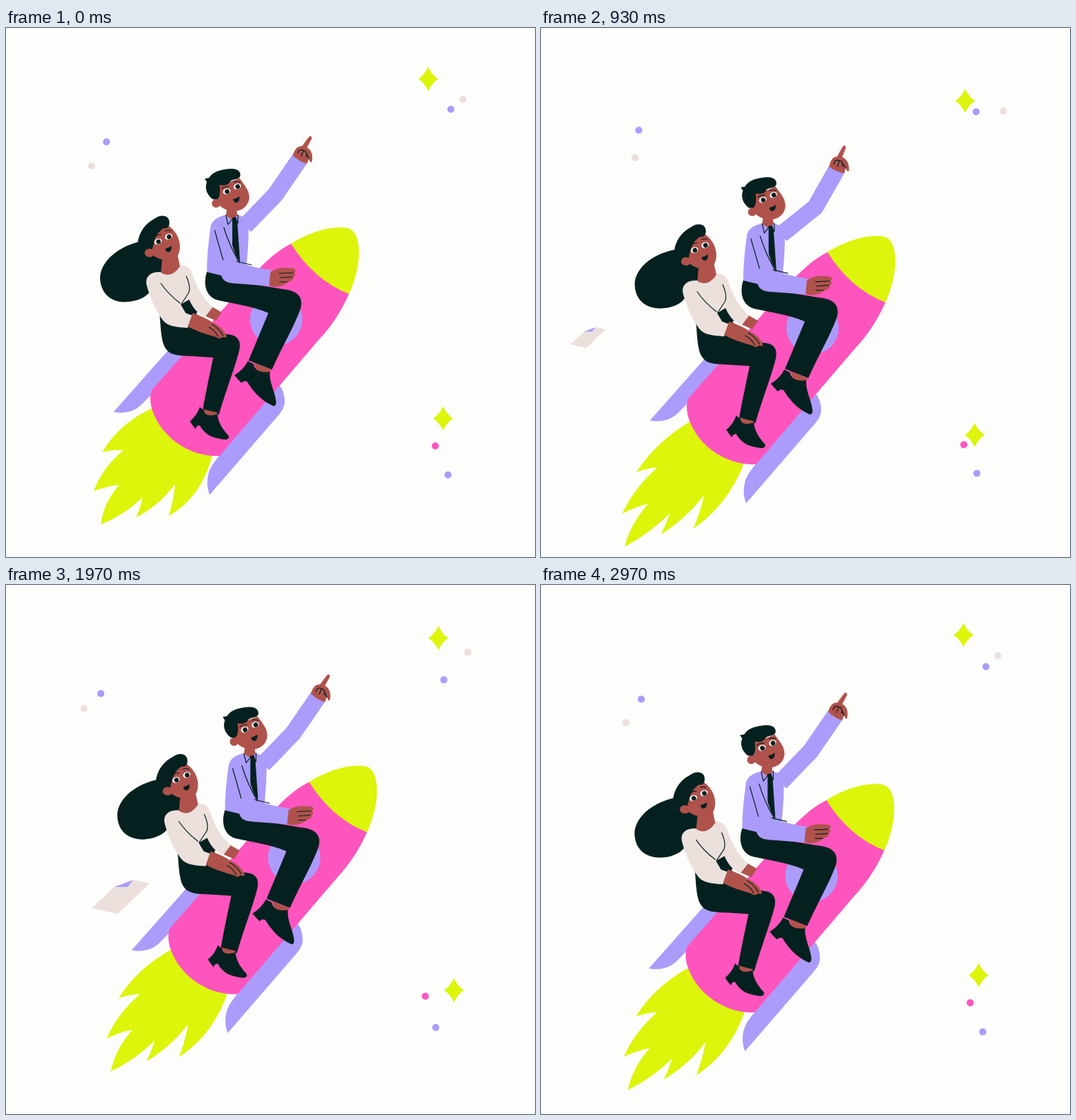
An HTML page that plays this animation: 748x748 px, repeating every 3.01 s.

```html
<!DOCTYPE html>
<html lang="en">
<head>
<meta charset="utf-8">
<title>Rocket ride</title>
<style>
html, body { margin: 0; width: 100%; height: 100%; overflow: hidden; background: #fdfdfc; }
svg { display: block; width: 100vw; height: 100vh; }
.yellow { fill: #dcf50a; }
.pink { fill: #fd55bd; }
.purple { fill: #ab9cfb; }
.dark { fill: #04211f; }
.skin { fill: #b0524c; }
.beige { fill: #ebe0dc; }
.white { fill: #fff; }
.line { fill: none; stroke: #04211f; stroke-width: 1.2; stroke-linecap: round; stroke-linejoin: round; }
</style>
</head>
<body>
<svg viewBox="0 0 748 748">
  <g id="papers"></g>
  <g id="sky"></g>
  <g id="ride">
    <!-- rocket -->
    <path id="flame" class="yellow" d="M212 535Q160 558 136 600Q150 596 166 597Q136 622 124 655Q142 648 160 646Q138 671 134 702Q167 689 193 664Q190 679 184 692Q217 675 239 645Q237 668 230 690Q276 664 292 604L250 560Z"/>
    <path class="purple" d="M230 455L152 543C168 546 182 542 192 532L262 462Z"/>
    <path class="purple" d="M386 505C391 509 394 519 394 528C394 537 389 543 384 549L288 660C283 648 283 630 293 616L320 580Z"/>
    <path class="pink" d="M403 305C383 315 369 329 355 343L207 511C202 519 204 535 209 546C223 581 262 607 302 605L443 440C462 420 475 398 485 376Z"/>
    <path class="yellow" d="M403 305C430 288 462 279 483 283C494 286 498 297 499 314C500 334 493 359 485 376Q436 357 403 305Z"/>
    <circle class="purple" cx="382" cy="412" r="37"/>

    <!-- woman -->
    <path id="hair" class="dark" d="M190 302C160 308 133 330 133 354C134 378 152 390 174 387C194 385 207 374 208 362L222 346L222 310Z"/>
    <path class="skin" d="M281 407L291 394L305 402L297 414Z"/>
    <path class="dark" d="M216 394C219 415 218 440 225 452C232 464 245 463 262 464L293 466C288 490 282 517 278 541L301 547C310 515 324 480 330 455C333 440 326 434 312 433C295 430 280 425 266 398Z"/>
    <path class="skin" d="M279 539L299 544L298 549L284 550Z"/>
    <path class="dark" d="M274 536L280 541Q281 551 299 546C300 560 309 570 315 577Q316 582 309 582C292 580 281 575 274 562Q269 562 268 567Q263 561 260 556Q270 548 274 536Z"/>
    <path class="beige" d="M219 345C203 344 196 353 199 364C204 383 212 400 221 412C227 421 238 423 257 424L264 404L268 398Q274 405 282 408L292 395C277 381 270 366 264 350C261 339 255 334 245 336Z"/>
    <path class="dark" d="M247 391L259 384Q263 394 271 402L262 406L254 403Z"/>
    <path class="skin" d="M221 325L219 346Q234 355 246 337L242 318Z"/>
    <path class="skin" d="M257 422L264 403C275 407 285 411 293 417C303 421 309 428 312 436Q311 439 306 437Q302 441 297 437C283 433 270 429 257 422Z"/>
    <path class="line" d="M219 361Q229 376 246 389M255 351Q262 367 258 375L248 390M291 419Q301 424 307 435M287 423Q296 428 300 436"/>
    <path class="skin" d="M221 275C236 281 245 293 246 308C246 322 240 328 231 328C221 329 211 325 206 319L205 292Z"/>
    <path class="dark" d="M187 322C183 300 190 280 211 269C221 262 232 266 231 276C231 281 228 284 223 283C215 288 211 295 209 304L206 316Q199 326 187 322Z"/>
    <ellipse class="skin" cx="203" cy="318" rx="7" ry="6"/>
    <g id="womanFace"></g>

    <!-- man -->
    <g class="lean">
      <path id="arm" fill="none" stroke="#ab9cfb" stroke-width="24" stroke-linejoin="round"/>
      <g id="hand">
        <path class="skin" d="M406 179C409 170 412 166 419 166L428 154Q432 149 433 155L426 168C432 171 435 178 433 188Q430 191 429 183L426 191Q415 188 406 179Z"/>
        <path class="line" d="M413 176Q415 169 421 172L418 180M421 172Q427 173 425 181M425 176L429 184"/>
      </g>
      <path class="purple" d="M312 264C300 267 290 271 289 284C286 305 284 325 284 347L313 358L340 335C342 315 343 300 343 281Q342 268 327 264Z"/>
      <path class="skin" d="M313 250L311 265L320 271L327 265L326 254Z"/>
      <path class="dark" d="M320 268L325 267L327 273L331 332L320 313L320 275Z"/>
      <path class="line" d="M311 265L314 278L321 269L328 276L328 264"/>
      <g id="head">
        <path class="skin" d="M296 222C305 222 318 218 330 212C336 221 344 228 344 240C343 252 333 259 322 259C312 259 302 253 299 247Z"/>
        <path class="dark" d="M292 242C283 235 281 225 284 218L281 213L287 212C292 203 304 200 317 199C328 198 333 204 331 210C328 215 321 213 317 217C314 223 307 223 302 222C303 231 303 239 298 243Z"/>
        <circle class="skin" cx="297" cy="248" r="6"/>
        <g id="manFace"></g>
      </g>
    </g>
    <path class="dark" d="M284 345C279 360 281 380 300 385C322 390 348 393 371 403L343 470L376 483C390 452 406 424 415 401C422 384 415 373 397 370C365 365 335 361 313 352Z"/>
    <path class="skin" d="M350 473L375 483L373 488L356 486Z"/>
    <path class="dark" d="M342 471L350 475Q353 489 373 486C372 503 381 514 382 530Q381 537 375 533C360 526 348 512 341 500Q336 498 333 502Q328 497 323 491Q336 483 342 471Z"/>
    <g class="lean">
      <path class="purple" d="M295 283L303 344C305 358 312 360 322 361L374 365L377 343C360 340 345 337 328 331L312 283Z"/>
      <path class="skin" d="M374 345C383 339 391 338 407 340Q412 343 407 346Q412 349 406 352Q408 357 399 359C393 365 381 368 372 364Z"/>
      <path class="line" d="M295 286L307 328M308 282Q315 306 330 332M326 330L347 335M386 347L406 346M388 353L405 352M387 359L398 359"/>
    </g>
  </g>
</svg>
<script>
const $ = id => document.getElementById(id);
const FRAMES = 90, LOOP = 3010, TURN = 2 * Math.PI;
const smooth = v => { v = Math.max(0, Math.min(1, v)); return v * v * (3 - 2 * v); };
const place = (el, value) => el.setAttribute('transform', value);

function add(parent, tag, attrs) {
  const el = document.createElementNS('http://www.w3.org/2000/svg', tag);
  for (const name in attrs) el.setAttribute(name, attrs[name]);
  parent.appendChild(el);
  return el;
}

// Rocket sway: a closed smooth curve through a few points
const SWAY = [
  { t: 0, x: 0, y: 0 }, { t: 17, x: -5.5, y: 16.5 }, { t: 28, x: 2, y: 12 },
  { t: 44, x: 29, y: -26 }, { t: 59, x: 25.5, y: -26.5 }, { t: 77, x: 7, y: -6.5 }
];
function sway(axis, i) {
  const n = SWAY.length;
  const time = k => SWAY[(k + n) % n].t + FRAMES * Math.floor(k / n);
  const value = k => SWAY[(k + n) % n][axis];
  const slope = k => (value(k + 1) - value(k - 1)) / (time(k + 1) - time(k - 1));
  const k = SWAY.findLastIndex(p => p.t <= i);
  const span = time(k + 1) - time(k), u = (i - time(k)) / span, ease = smooth(u);
  return value(k) * (1 - ease) + value(k + 1) * ease
    + span * u * (1 - u) * (slope(k) * (1 - u) - slope(k + 1) * u);
}

// Stars and dots circle a home point on an ellipse spanned by two vectors
const STAR = 'M0-17Q5-6 14 0Q5 6 0 17Q-5 6-14 0Q-5-6 0-17Z';
const star = color => add($('sky'), 'path', { class: color, d: STAR });
const dot = color => add($('sky'), 'circle', { class: color, r: 5 });
const sky = [
  { el: star('yellow'), home: [603, 83], cos: [-6, -11], sin: [-6, 17] },
  { el: star('yellow'), home: [622, 567], cos: [-4, -15], sin: [-11, 3] },
  { el: dot('purple'), home: [621, 123], cos: [8, -8], sin: [-3, -8] },
  { el: dot('beige'), home: [651, 104], cos: [-5, -3], sin: [1, 13] },
  { el: dot('purple'), home: [138, 153], cos: [4, 8], sin: [2, -6] },
  { el: dot('beige'), home: [121, 184], cos: [0, 11], sin: [13, 4] },
  { el: dot('pink'), home: [599, 587], cos: [8, 4], sin: [2, 4] },
  { el: dot('purple'), home: [616, 629], cos: [9, 3], sin: [4, 2] }
];

// Sheets blow past from the upper right, all at one speed
const SHEET_LIFE = 20;
const sheets = [
  { start: 10, x: 412, y: 103 }, { start: 29, x: 737, y: 276 },
  { start: 44, x: 450, y: 162 }, { start: 63, x: 755, y: 374 }
];
for (const s of sheets) {
  s.el = add($('papers'), 'g', {});
  add(s.el, 'path', { class: 'beige', d: 'M-41 16L-4 24L41-19L18-24L-9-14Z' });
  add(s.el, 'path', { class: 'purple', d: 'M-9-14L18-24L10-14Z' });
}

function face(parent, eyes, brows, mouth) {
  for (const [x, y] of eyes) {
    const eye = add(parent, 'g', { transform: `translate(${x} ${y}) rotate(-22)` });
    add(eye, 'ellipse', { class: 'white', rx: 5.4, ry: 4 });
    add(eye, 'circle', { class: 'dark', cx: 0.5, cy: 0.5, r: 3.3 });
  }
  add(parent, 'path', { class: 'line', d: brows });
  add(parent, 'path', { class: 'dark', d: mouth });
}
face($('womanFace'), [[215, 302], [230, 295]], 'M210 296Q213 292 219 292M225 287Q229 285 233 287',
  'M225 312Q230 311 234 308Q235 315 230 317Q226 317 225 312Z');
face($('manFace'), [[312, 231], [327, 224]], 'M305 227Q309 224 315 224M322 218Q327 216 331 218',
  'M321 242Q326 241 330 238Q331 245 326 247Q322 247 321 242Z');

const polar = ([x, y], length, degrees) => {
  const a = degrees * TURN / 360;
  return [x + length * Math.cos(a), y + length * Math.sin(a)];
};

function draw(i) {
  place($('ride'), `translate(${sway('x', i)} ${sway('y', i)})`);

  const c = Math.cos(TURN * i / FRAMES), s = Math.sin(TURN * i / FRAMES);
  for (const { el, home, cos, sin } of sky) {
    place(el, `translate(${home.map((h, axis) => h + cos[axis] * c + sin[axis] * s)})`);
  }

  for (const { el, start, x, y } of sheets) {
    const age = i - start;
    const size = smooth(age / 3.5) * smooth((SHEET_LIFE - age) / 3.5);
    el.style.display = size ? '' : 'none';
    place(el, `translate(${x - 19.2 * age} ${y + 18.6 * age}) scale(${size})`);
  }

  // The flame flickers in three beats, longer and thinner along its axis
  const flare = [0, 1, 0.65][i % 3];
  place($('flame'), `translate(250 570) rotate(132) scale(${1 + 0.15 * flare} ${1 - 0.13 * flare}) rotate(-132) translate(-250 -570)`);
  place($('hair'), `rotate(${4 * (Math.cos(TURN / 10) - Math.cos(TURN * (i - 1) / 10))} 205 320)`);

  const rise = smooth((i - 2) / 12);
  const lean = rise * smooth((29 - i) / 12);
  const bend = rise * smooth((32 - i) / 15);
  document.querySelectorAll('.lean').forEach(el => place(el, `rotate(${-6.5 * lean} 293 365)`));
  place($('head'), `translate(${-3 * lean} ${4 * lean}) rotate(${-6 * lean} 318 262)`);

  const shoulder = [338, 280];
  const elbow = polar(shoulder, 61.5, -46 + 42 * bend);
  const wrist = polar(elbow, 61.5, -55.5 - 27 * bend);
  $('arm').setAttribute('d', `M${shoulder}L${elbow}L${wrist}`);
  place($('hand'), `translate(${wrist}) rotate(${-43 * bend}) translate(-416 -184)`);
}

function tick(now) {
  draw(Math.min(FRAMES - 1, Math.floor((now % LOOP + 3.4) * 0.03)));
  requestAnimationFrame(tick);
}
draw(0);
requestAnimationFrame(tick);
</script>
</body>
</html>
```
